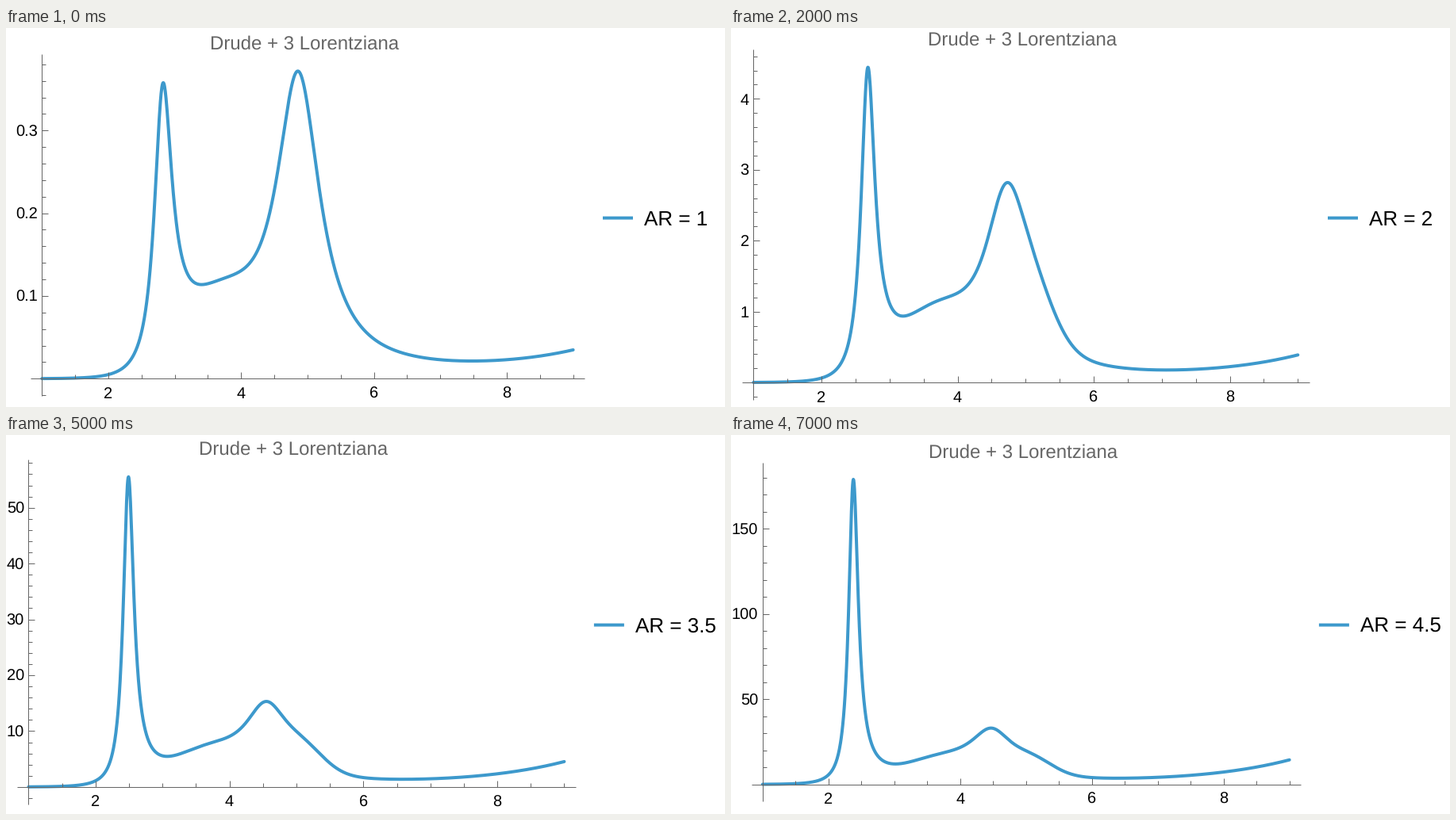
Write a matplotlib script that moves like this. It is 906 px wide and 478 px high and loops after 8 s.

```python
import numpy as np
import matplotlib.pyplot as plt
from matplotlib.animation import FuncAnimation

plt.rcParams["text.hinting"] = "none"

WIDTH, HEIGHT, DPI = 906, 478, 64
PT = 72 / DPI  # points per pixel
BLUE, GREY = "#3d99cc", "#666666"
GOLDEN = (1 + 5 ** 0.5) / 2
MID_Y = 248.3
RATIOS = np.arange(1, 5, 0.5)


def bell(x, mid, width):
    return np.exp(-((x - mid) / width) ** 2)


def oscillator(x, p, g):
    """Scattering by a damped oscillator, about 1 at its resonance p."""
    return (g / p) ** 2 * x ** 4 / ((p * p - x * x) ** 2 + (g * x) ** 2)


def spectrum(ratio):
    """Sharp resonance, broad band with two shoulders, rising far end."""
    c, log = ratio - 1, np.log(ratio)
    p1 = 2.816 - 0.145 * c + 0.0055 * c ** 2
    p2 = 4.86 - 0.165 * c + 0.0158 * c ** 2
    damping = 0.155 + 0.17 * np.exp(-0.6 * c)
    left = 0.39 - 0.22 * np.exp(-0.85 * c)
    right = 0.3 * (1 - np.exp(-1.8 * c ** 2))
    second = 1 / (0.957 + 0.81 * c ** 2 / (1 + 1.9 * c ** 2) ** 0.25)
    peak = 0.356 * ratio ** (2.668 + 1.9095 * log - 0.832 * log ** 2 + 0.14 * log ** 3)

    def sharp(x):
        return oscillator(x, p1, damping)

    def band(x):
        core = 1 / (1 + ((x - p2) / 0.4) ** 2) / (1 + (3 / x) ** 12)
        return core + left * bell(x, 3.7, 0.75) + right * bell(x, 5.1, 0.45)

    x = np.linspace(1, 9, 1400)
    broad = (second - sharp(p2)) / band(p2)
    narrow = 1 - broad * band(p1)
    y = narrow * sharp(x) + broad * band(x) + 0.073 * (x / 9) ** 7
    return x, peak * y


def tick_steps(top):
    """Smallest 1-2-5 step giving at most seven labels, and its subdivision."""
    power = 10 ** np.floor(np.log10(top / 7))
    lead = next(n for n in (1, 2, 5, 10) if n * power >= top / 7)
    return lead * power, lead * power / (4 if lead == 2 else 5)


def ticks(lo, hi, major, minor):
    """Value and major flag of every tick but zero."""
    per = round(major / minor)
    for k in range(int(np.ceil(lo / minor)), int(np.floor(hi / minor)) + 1):
        if k:
            yield k * minor, k % per == 0


fig = plt.figure(figsize=(WIDTH / DPI, HEIGHT / DPI), dpi=DPI, facecolor="white")
ax = fig.add_axes([0, 0, 1, 1])


def write(x, y, text, size, color="black", ha="left"):
    ax.text(x, y, text, fontsize=size * PT, color=color, ha=ha,
            va="baseline", family="Liberation Sans")


def rule(x, y):
    ax.plot(x, y, color=GREY, lw=PT, solid_capstyle="butt", zorder=3)


def draw(i):
    ax.clear()
    ax.set(xlim=(0, WIDTH), ylim=(HEIGHT, 0))
    ax.axis("off")

    ratio = RATIOS[i]
    x, y = spectrum(ratio)
    top = y.max()
    major, minor = tick_steps(top)

    def label(v):
        return f"{v:.1f}" if major < 0.9 else f"{v:.0f}"

    # The plot shrinks with the widest label and shifts with the legend.
    widest = label(np.floor(top / major) * major)
    digits = sum(ch.isdigit() for ch in widest)
    w = 726.2 - 11.55 * digits - 5.75 * ("." in widest)
    h = w / GOLDEN
    shift = 0 if ratio % 1 == 0 else -11.1
    right = 728.6 + shift
    left = right - w
    upper, lower = MID_Y - h / 2, MID_Y + h / 2
    x0, y0 = left + 0.02 * w, lower - 0.05 * h

    def px(v):
        return x0 + (v - 1) * 0.12 * w

    def py(v):
        return y0 - v / top * 0.9 * h

    ax.plot(px(x), py(y), color=BLUE, lw=4 * PT, solid_capstyle="round",
            solid_joinstyle="round", zorder=2)

    rule([left, right], [y0, y0])
    rule([x0, x0], [upper, lower])
    for v, big in ticks(1.5, 9, 2, 0.5):
        rule([px(v)] * 2, [y0, y0 - (8 if big else 5)])
        if big:
            write(px(v), y0 + 24.5, f"{v:.0f}", 20, ha="center")
    for v, big in ticks(-top / 18, top * 19 / 18, major, minor):
        rule([x0, x0 + (8 if big else 5)], [py(v)] * 2)
        if big:
            write(x0 - 5.5, py(v) + 7.3, label(v), 20, ha="right")

    write((left + right) / 2 - 4, upper - 6, "Drude + 3 Lorentziana",
          24, GREY, "center")
    ax.plot([752 + shift, 790 + shift], [239.6] * 2, color=BLUE, lw=4 * PT,
            solid_capstyle="butt", snap=False)
    write(804.5 + shift, 249, f"AR = {ratio:g}", 26)
    return []


anim = FuncAnimation(fig, draw, frames=len(RATIOS), interval=1000,
                     repeat=True, repeat_delay=0, blit=False)
plt.show()
```
